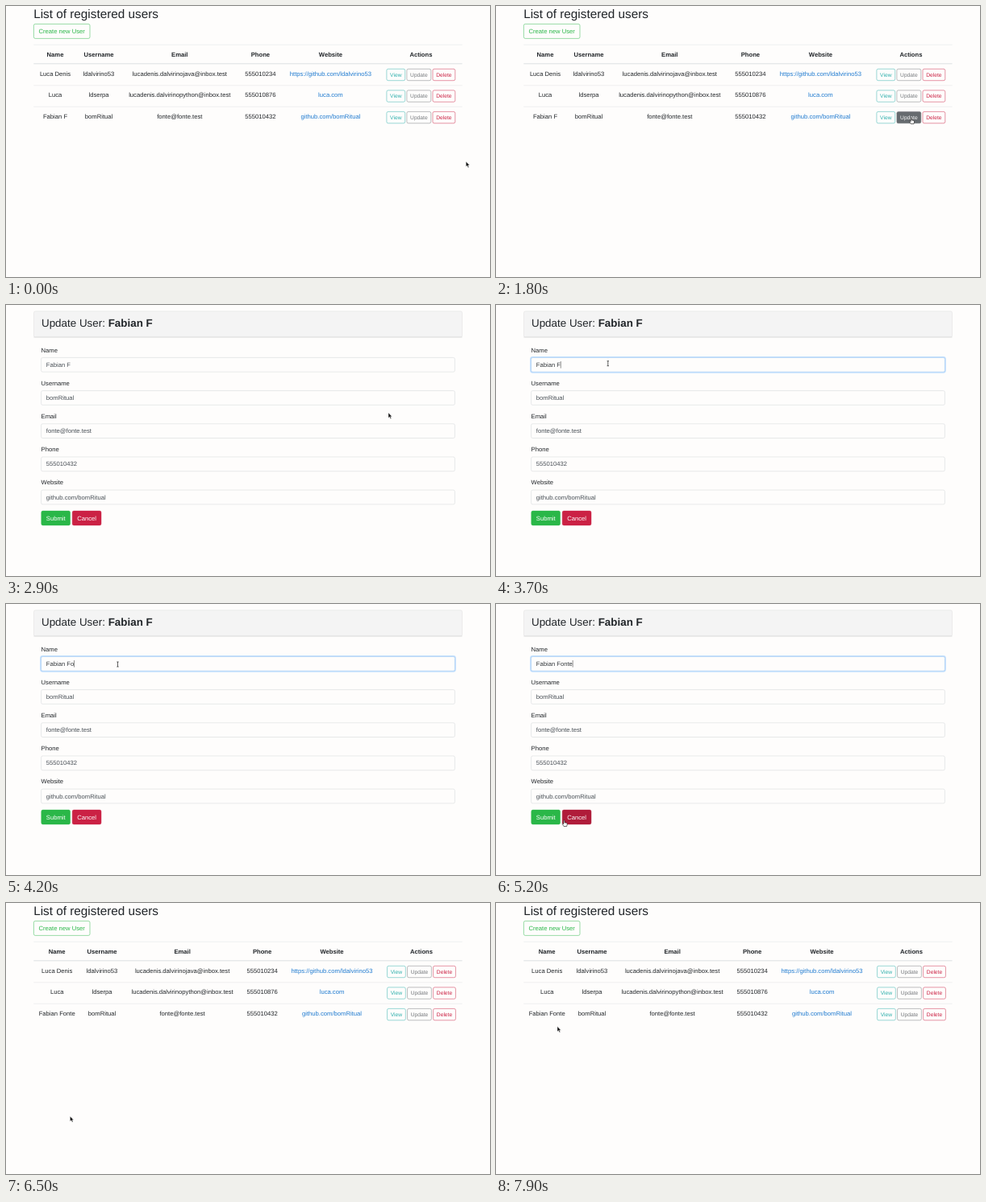
Recreate the animation shown at these times as an HTML page. Size 600 px wide and 337 px high, loop 8000 ms.

```html
<!DOCTYPE html>
<html lang="en">
<head>
<meta charset="utf-8">
<title>User administration</title>
<style>
  html, body { margin: 0; width: 100%; height: 100%; overflow: hidden; background: #fefdfc; }
  svg { display: block; width: 100vw; height: 100vh; }
  text { font-family: "Liberation Sans", Arial, sans-serif; text-rendering: geometricPrecision; white-space: pre; }
</style>
</head>
<body>
<svg id="stage" viewBox="0 0 600 337"></svg>
<script>
const LOOP = 8000, TICK = 100;
const BODY = 7.65, SMALL = 6.7, LINE = 0.48;
const INK = '#212529', FIELD_INK = '#495057', LINK = '#1e7ad0';
const GREEN = '#2ab748', RED = '#cb2144', TEAL = '#2aafab', GRAY = '#74787c';

// Events in ms
const T = { barHover: 2000, press: 2300, openForm: 2700, focus: 3400, blur: 5600, barSubmit: 5700, openList: 6200 };
const TYPED = [[4200, 'o'], [4300, 'n'], [4500, 't'], [4600, 'e']];

// Pointer hotspot: time, x, y
const PATH = [
  [0, 570.2, 193.5], [1200, 570.2, 193.5], [1700, 514.8, 139], [1800, 514.8, 139], [2000, 512.9, 141.2],
  [2800, 512.9, 141.2], [3300, 139, 73], [3600, 138.8, 72.7], [4000, 138.8, 72.7], [4100, 138.5, 75],
  [4500, 138.5, 75], [4900, 112, 289], [5300, 79.4, 265.2], [7100, 79.4, 265.2], [7600, 76, 153.6]
];

const USERS = [
  ['Luca Denis', 'ldalvirino53', 'lucadenis.dalvirinojava@inbox.test', '555010234', 'https://github.com/ldalvirino53'],
  ['Luca', 'ldserpa', 'lucadenis.dalvirinopython@inbox.test', '555010876', 'luca.com'],
  ['Fabian F', 'bomRitual', 'fonte@fonte.test', '555010432', 'github.com/bomRitual']
];
const HEADS = ['Name', 'Username', 'Email', 'Phone', 'Website', 'Actions'];
const COLS_BEFORE = [61, 115, 215.3, 315.4, 402.4, 514.4];
const COLS_AFTER = [63.2, 119, 218.6, 317.6, 404, 515];

const stage = document.getElementById('stage');
const pen = document.createElement('canvas').getContext('2d');

function textWidth(s, size) {
  pen.font = '100px "Liberation Sans", Arial, sans-serif';
  return pen.measureText(s).width * size / 100;
}

function text(s, x, y, { size = BODY, fill = INK, anchor = 'start', weight = 400 } = {}) {
  return `<text x="${x}" y="${y}" font-size="${size}" fill="${fill}" text-anchor="${anchor}" font-weight="${weight}">${s}</text>`;
}

function box(x, y, w, h, fill, stroke, width = LINE, r = 1.9) {
  return `<rect x="${x}" y="${y}" width="${w}" height="${h}" rx="${r}" fill="${fill}" stroke="${stroke}" stroke-width="${width}"/>`;
}

function ring(x, y, w, h, color, opacity) {
  return `<rect x="${x - .75}" y="${y - .75}" width="${w + 1.5}" height="${h + 1.5}" rx="2.6" fill="none" stroke="${color}" stroke-width="1.5" opacity="${opacity}"/>`;
}

function rule(y, width, color) {
  return `<path d="M34.3 ${y}H565.6" stroke="${color}" stroke-width="${width}"/>`;
}

const inside = (p, x, y, w, h) => p.x >= x && p.x <= x + w && p.y >= y && p.y <= y + h;

function pointerAt(t) {
  const i = PATH.findIndex(k => k[0] > t);
  if (i < 0) return { x: PATH.at(-1)[1], y: PATH.at(-1)[2], kind: 'arrow' };
  const [t0, x0, y0] = PATH[i - 1], [t1, x1, y1] = PATH[i];
  const u = (t - t0) / (t1 - t0), e = u * u * (3 - 2 * u);
  return { x: x0 + (x1 - x0) * e, y: y0 + (y1 - y0) * e, kind: 'arrow' };
}

function button(p, label, x, y, w, h, o) {
  const hover = inside(p, x, y, w, h);
  if (hover) p.kind = 'hand';
  const fill = hover ? o.hover : o.solid ? o.color : 'none';
  const ink = hover || o.solid ? '#fff' : o.color;
  const size = o.size || BODY;
  return (o.ring ? ring(x, y, w, h, o.color, .5) : '') +
    box(x, y, w, h, fill, hover ? o.hover : o.color) +
    text(label, x + w / 2, y + h / 2 + size * .35, { size, fill: ink, anchor: 'middle' });
}

function listPage(t, p) {
  const done = t >= T.openList;
  const cols = done ? COLS_AFTER : COLS_BEFORE;
  let out = text('List of registered users', 34.2, 14.5, { size: 15.3 });
  out += button(p, 'Create new User', 34.4, 22.4, 69.6, 18, { color: GREEN, hover: '#239a3c' });
  out += rule(48.2, LINE, '#dcdfe2') + rule(71.8, .96, '#dcdfe2');
  HEADS.forEach((s, i) => out += text(s, cols[i], 62.8, { anchor: 'middle', weight: 700 }));
  USERS.forEach((user, r) => {
    const y = 72.2 + r * 26.55;
    if (r) out += rule(y, LINE, '#dcdfe2');
    user.forEach((s, c) => {
      const value = done && r === 2 && c === 0 ? 'Fabian Fonte' : s;
      out += text(value, cols[c], y + 14.5, { anchor: 'middle', fill: c === 4 ? LINK : INK });
    });
    const x = cols[5], top = y + 6.1, h = 14.4;
    const pressed = r === 2 && !done && t >= T.press;
    out += button(p, 'View', x - 42.5, top, 22.8, h, { color: TEAL, hover: '#23938f', size: SMALL });
    out += button(p, 'Update', x - 17.5, top, 29.9, h, { color: GRAY, hover: '#666b6f', size: SMALL, ring: pressed });
    out += button(p, 'Delete', x + 14.6, top, 27.8, h, { color: RED, hover: '#b01c3a', size: SMALL });
  });
  return out;
}

function formPage(t, p) {
  const typed = TYPED.filter(k => t >= k[0]).map(k => k[1]).join('');
  const [name, ...rest] = USERS[2];
  const values = [name + typed, ...rest];
  const focused = t >= T.focus && t < T.blur;
  let out = box(34.5, 7.8, 531, 32.2, '#f4f4f4', '#dedede') + rule(40, .6, '#d0d0d0');
  out += text('Update User: ', 44, 26.6, { size: 13.4 });
  out += text(name, 126.7, 26.6, { size: 13.4, weight: 700 });
  values.forEach((s, i) => {
    const y = 65.4 + i * 41.17, active = focused && i === 0;
    const rect = [43.6, y, 512.8, 17.8];
    if (inside(p, ...rect)) p.kind = 'beam';
    out += text(HEADS[i], 43.6, y - 6.9);
    if (active) out += ring(...rect, '#3d9bff', .3);
    out += box(...rect, '#fefdfc', active ? '#80b8ee' : '#ced2d6');
    out += text(s, 49.8, y + 11.5, { fill: active ? '#33383c' : FIELD_INK });
    if (active) {
      const x = 50.1 + textWidth(s, BODY);
      out += `<path d="M${x} ${y + 4.6}v8.6" stroke="#222" stroke-width=".5"/>`;
    }
  });
  out += button(p, 'Submit', 43.8, 256.1, 35.8, 17.8, { color: GREEN, hover: '#239638', solid: true, ring: t >= T.blur });
  out += button(p, 'Cancel', 82.2, 256.1, 35.8, 17.8, { color: RED, hover: '#b01c3a', solid: true });
  return out;
}

function statusBar() {
  return '<path d="M0 327.6H140.3Q141.7 327.6 141.7 329V337H0Z" fill="#2e3031"/>' +
    '<text x="1.6" y="334.8" font-size="6.4" fill="#e6e6e6" style="font-family:\'Noto Sans\',sans-serif">localhost</text>';
}

const POINTERS = {
  arrow: '<path d="M0 0V6.3L1.5 5L2.6 7.4L3.7 6.9L2.6 4.6H4.5Z" fill="#111" stroke="#fff" stroke-width=".4"/>',
  hand: '<path d="M-.6 .6Q0 -.3 .6 .6V2.9L3 3.4Q4 3.8 3.8 5L3.2 7.6H-.4L-2.4 4.6Q-2.1 3.6 -.6 4.6Z" fill="#fff" stroke="#111" stroke-width=".6"/>',
  beam: '<path d="M-1.2 -3H1.2M0 -3V3M-1.2 3H1.2" stroke="#222" stroke-width=".7"/>'
};

function scene(t) {
  const p = pointerAt(t);
  const onForm = t >= T.openForm && t < T.openList;
  const bar = (t >= T.barHover && t < T.openForm) || (t >= T.barSubmit && t < T.openList);
  const page = onForm ? formPage(t, p) : listPage(t, p);
  return page + (bar ? statusBar() : '') + `<g transform="translate(${p.x} ${p.y})">${POINTERS[p.kind]}</g>`;
}

let start, shown;
function frame(now) {
  start ??= now;
  const t = Math.floor(((now - start) % LOOP) / TICK) * TICK;
  if (t !== shown) stage.innerHTML = scene(shown = t);
  requestAnimationFrame(frame);
}
stage.innerHTML = scene(shown = 0);
requestAnimationFrame(frame);
</script>
</body>
</html>
```
